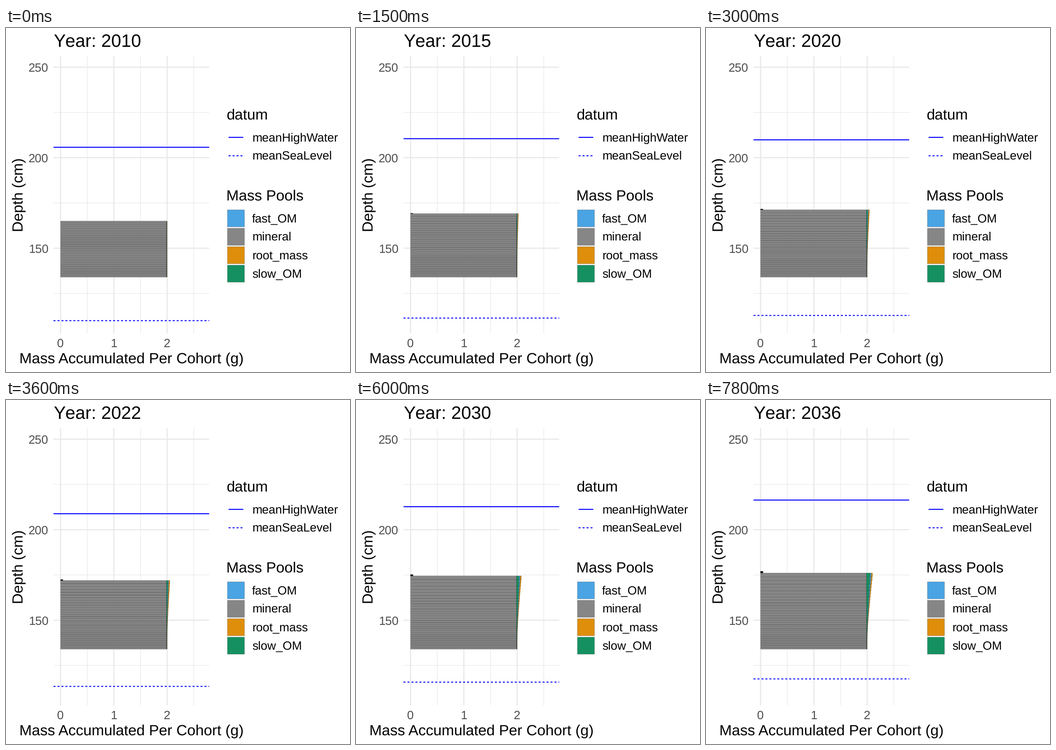
Write a matplotlib script that moves like this. It is 748 by 748 pixels and loops after 8 s.

```python
import math

import matplotlib.pyplot as plt
from matplotlib.animation import FuncAnimation
from matplotlib.collections import PolyCollection
from matplotlib.patches import Rectangle

SIZE, DPI = 748, 100
PT = 72 / DPI  # points per pixel
STEP_MS, LOOP_MS, YEAR_MS = 100, 8000, 300

LEFT, RIGHT, TOP, BOTTOM = 103.3, 441.8, 61.5, 664
GRAM, CM = 115.85, 3.937  # pixels per data unit
TITLE, HEADING, SMALL = 39, 32.5, 26  # text sizes in pixels
FAST, MINERAL, ROOT, SLOW = "#4aa4e3", "#868686", "#de8e0a", "#159161"
POOLS = (MINERAL, SLOW, FAST, ROOT)
BLUE = "#0000ff"
DATUM_WIDTH = 2.16
DASHED = (0, (2, 2))
OLD_COHORTS, BASE_DEPTH = 31, 134
TRACE = 0.004  # grams of each organic pool present from the start

plt.rcParams["font.family"] = "Liberation Sans"
plt.rcParams["text.hinting"] = "none"

fig = plt.figure(figsize=(SIZE / DPI, SIZE / DPI), dpi=DPI, facecolor="white")
ax = fig.add_axes([0, 0, 1, 1])
ax.set(xlim=(0, SIZE), ylim=(SIZE, 0))
ax.axis("off")


def px(mass):
    return 118.7 + mass * GRAM


def py(depth):
    return 282 + (200 - depth) * CM


def line(x0, y0, x1, y1, color, width, style="-", z=1):
    return ax.plot([x0, x1], [y0, y1], color=color, lw=width * PT, ls=style,
                   solid_capstyle="butt", dash_capstyle="butt",
                   snap=False, zorder=z)[0]


def label(x, y, text, size, color="black", ha="left", **kw):
    return ax.text(x, y, text, fontsize=size * PT, color=color, ha=ha,
                   va="baseline", **kw)


def draw_grid():
    for k in range(6):
        width = 1.2 if k % 2 else 2.4
        x = px(k / 2)
        line(x, TOP, x, BOTTOM, "#e8e8e8", width)
        if k % 2 == 0:
            label(x, 694, str(k // 2), SMALL, "#4d4d4d", "center")
    for depth in range(125, 251, 25):
        major = depth % 50 == 0
        line(LEFT, py(depth), RIGHT, py(depth), "#e8e8e8", 2.4 if major else 1.2)
        if major:
            label(92, py(depth) + 9.4, str(depth), SMALL, "#4d4d4d", "right")
    label((LEFT + RIGHT) / 2, 728.5, "Mass Accumulated Per Cohort (g)", HEADING,
          ha="center")
    label(36, (TOP + BOTTOM) / 2 - 0.6, "Depth (cm)", HEADING, ha="center",
          rotation=90, rotation_mode="anchor")


def draw_legend():
    label(479.5, 198.5, "datum", HEADING)
    for y, name, style in ((237.8, "meanHighWater", "-"),
                           (277.8, "meanSeaLevel", DASHED)):
        line(484, y, 516, y, BLUE, DATUM_WIDTH, style)
        label(535, y + 9.4, name, SMALL)
    label(479.5, 374.5, "Mass Pools", HEADING)
    entries = (("fast_OM", FAST), ("mineral", MINERAL),
               ("root_mass", ROOT), ("slow_OM", SLOW))
    for k, (name, color) in enumerate(entries):
        y = 413.9 + 40.1 * k
        ax.add_patch(Rectangle((481.5, y - 18.5), 37, 37, fc=color,
                               ec=(0, 0, 0, 0.3), lw=0.9 * PT, snap=False))
        label(535, y + 9.2, name, SMALL)


def sea_level(t):
    return 110 + 0.284 * t + 0.0003 * t * t


def high_water(t):
    # Tidal range follows the 18.61-year lunar nodal cycle.
    return sea_level(t) + 96.65 + 2.5 * math.sin(2 * math.pi * (t - 1.1) / 18.61)


def stacked_row(low, high, masses):
    y0, y1, x, row = py(low), py(high), 0, []
    for mass in masses:
        x0, x1 = px(x), px(x + mass)
        row.append([(x0, y0), (x1, y0), (x1, y1), (x0, y1)])
        x += mass
    return row


def cohort_boxes(t):
    """Old cohorts swell with roots; a thin new one settles on top each year."""
    root = 2.2 * (1 - math.exp(-t / 5)) / GRAM
    fast = 2.3 * (1 - math.exp(-t / 14)) / GRAM
    slow = 0.08 * t ** 1.4 / GRAM
    shares = [(k / (OLD_COHORTS - 1)) ** 2.2 for k in range(OLD_COHORTS)]
    swelling = 1.57 * t ** 0.6 / sum(shares)
    boxes, low = [], BASE_DEPTH
    for share in shares:
        high = low + 1 + swelling * share
        organic = [TRACE + pool * share for pool in (slow, fast, root)]
        boxes += stacked_row(low, high, [2 - 3 * TRACE, *organic])
        low = high
    for _ in range(t):
        boxes += stacked_row(low, low + 0.035, (0.018, 0.006, 0.006, 0.015))
        low += 0.035
    return boxes


draw_grid()
draw_legend()
# The initial stands alone so that it is not kerned into the next letter.
label(LEFT, 40.7, "Y", TITLE)
title = label(LEFT + 0.667 * TITLE, 40.7, "", TITLE)
bars = PolyCollection([], edgecolors=[(0, 0, 0, 0.4)], linewidths=0.55 * PT,
                      zorder=3)
bars.set_snap(False)
ax.add_collection(bars, autolim=False)
high_line = line(LEFT, 0, RIGHT, 0, BLUE, DATUM_WIDTH, z=4)
sea_line = line(LEFT, 0, RIGHT, 0, BLUE, DATUM_WIDTH, DASHED, z=4)


def update(frame):
    t = frame * STEP_MS // YEAR_MS
    title.set_text(f"ear: {2010 + t}")
    boxes = cohort_boxes(t)
    bars.set_verts(boxes)
    bars.set_facecolor(POOLS * (len(boxes) // len(POOLS)))
    for datum, level in ((high_line, high_water), (sea_line, sea_level)):
        datum.set_ydata([py(level(t))] * 2)
    return title, bars, high_line, sea_line


anim = FuncAnimation(fig, update, frames=LOOP_MS // STEP_MS, interval=STEP_MS,
                     repeat=True, repeat_delay=0, blit=False)
plt.show()
```
